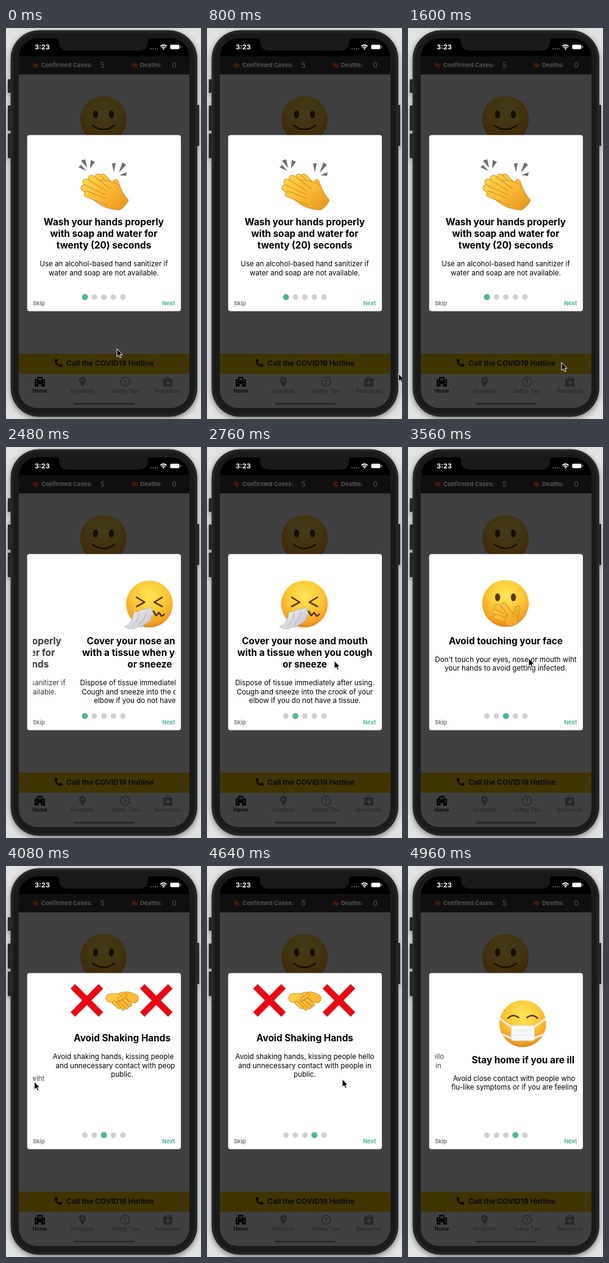
Write an HTML page that moves like this. It is 320 px wide and 640 px high and loops after 5000 ms.

```html
<!DOCTYPE html>
<html lang="en">
<head>
<meta charset="utf-8">
<title>Safety tips carousel</title>
<style>
  html, body { margin: 0; height: 100%; overflow: hidden; background: #e2e2e2; }
  svg { display: block; width: 100vw; height: 100vh; font-family: Inter, Roboto, sans-serif; }
  .title { font-size: 15.35px; font-weight: 700; text-anchor: middle; }
  .body { font-size: 11.6px; text-anchor: middle; }
  .link { font-size: 9.3px; font-weight: 700; }
  .stat { font-size: 9.5px; font-weight: 700; fill: #565656; }
  .tab { font-size: 8.45px; font-weight: 500; text-anchor: middle; fill: #272727; }
  .line { fill: none; stroke: #5c3206; stroke-width: 2.6; stroke-linecap: round; stroke-linejoin: round; }
  .phone { filter: drop-shadow(0 3px 5px rgba(0, 0, 0, .45)); }
</style>
</head>
<body>
<svg viewBox="0 0 320 640">
  <defs>
    <radialGradient id="skin" cy=".32" r=".7">
      <stop offset="0" stop-color="#ffe558"/><stop offset=".5" stop-color="#fdc935"/>
      <stop offset=".83" stop-color="#f6a324"/><stop offset="1" stop-color="#dc7a14"/>
    </radialGradient>
    <linearGradient id="hand" gradientUnits="userSpaceOnUse" x1="-25" y1="-15" x2="28" y2="38">
      <stop offset="0" stop-color="#ffd24a"/><stop offset=".55" stop-color="#fbb933"/><stop offset="1" stop-color="#ea9a20"/>
    </linearGradient>
    <linearGradient id="cloth" x2="1" y2="1">
      <stop offset="0" stop-color="#fafafc"/><stop offset="1" stop-color="#bdbdc4"/>
    </linearGradient>
    <clipPath id="window"><path d="M44 175H278V463H44Z"/></clipPath>
    <clipPath id="disc"><circle r="38"/></clipPath>
    <g id="face"><circle r="38.3" fill="url(#skin)"/></g>
    <g id="eyes" fill="#5c3206"><ellipse cx="-13" cy="-8" rx="4.2" ry="6.4"/><ellipse cx="13" cy="-8" rx="4.2" ry="6.4"/></g>
    <g id="smile"><use href="#face"/><use href="#eyes"/><path class="line" d="M-18 10Q0 23 18 10"/></g>
    <g id="sneeze">
      <use href="#face"/>
      <path class="line" d="M-21 -11L-8 -3 -21 4M21 -11L8 -3 21 4M2 17l5-5 4 7 5-5 4 6 4-3"/>
      <path fill="url(#cloth)" stroke="#a9a9b0" stroke-width=".7" d="M-25 12Q-19 15 -15 10Q-6 9 4 5Q3 11 7 16Q3 20 2 27L-5 32Q-10 34 -13 38Q-20 36 -25 40Q-34 42 -41 37Q-34 35 -31 30Q-26 20 -25 12Z"/>
      <path fill="none" stroke="#a9a9b2" d="M-17 15Q-18 28 -29 36M-5 13Q-9 26 -17 34"/>
    </g>
    <g id="mask">
      <use href="#face"/>
      <path class="line" d="M-24 -9Q-16 -17 -7 -10M7 -10Q16 -17 24 -9"/>
      <g clip-path="url(#disc)"><path fill="none" stroke="#eef1f6" stroke-width="3" d="M-39 -9L-18 6M39 -9L18 6M-36 17L-18 24M36 17L18 24"/></g>
      <rect x="-19" y="3" width="38" height="25" rx="3" fill="#f7f8fb" stroke="#cfd3dc" stroke-width=".8"/>
      <path stroke="#dde1e8" d="M-17 11H17M-17 19H17"/>
    </g>
    <g id="cross" fill="none"><path stroke="#c40a14" stroke-width="10.500" d="M-23 -23L23 23M23 -23L-23 23"/><path stroke="#f2040f" stroke-width="9" d="M-22.500 -22.500L22.500 22.500M22.500 -22.500L-22.500 22.500"/></g>
  </defs>

  <!-- phone -->
  <g fill="#242424" class="phone">
    <path d="M3 84h6v22H3zM3 127h6v41H3zM3 173h6v40H3zM312 126h5v67h-5z"/>
    <rect x="8" y="4" width="305.500" height="632" rx="46" stroke="#303030"/>
  </g>
  <rect x="12" y="8" width="297.500" height="624" rx="42" fill="#1a1a1a"/>
  <rect x="21" y="17" width="280" height="605" rx="30" fill="#404040"/>
  <path d="M21 46V47A30 30 0 0 1 51 17H271A30 30 0 0 1 301 47V46Z"/>
  <path fill="#1a1a1a" d="M82 16Q87 17 87 22Q87 37 102 37H218Q233 37 233 22Q233 17 238 16Z"/>
  <path fill="#101010" d="M21 46H301V76H21Z"/>
  <text x="47" y="35" fill="#fff" font-size="11" font-weight="700">3:23</text>
  <g fill="#777"><circle cx="238" cy="34" r="1"/><circle cx="241.500" cy="34" r="1"/><circle cx="245" cy="34" r="1"/><circle cx="248.500" cy="34" r="1"/></g>
  <path fill="none" stroke="#fff" stroke-width="1.800" d="M253.500 30Q258.500 25.500 263.500 30M255.500 32.200Q258.500 29.600 261.500 32.200"/>
  <circle cx="258.500" cy="34" r="1.300" fill="#fff"/>
  <rect x="269.500" y="27.500" width="15" height="7" rx="2" fill="#fff" stroke="#aaa" stroke-width=".8"/>
  <path fill="#bbb" d="M286 29.500h1.200v3H286z"/>

  <!-- dimmed home screen -->
  <g id="virus"></g>
  <g class="stat">
    <text x="58" y="64">Confirmed Cases:</text><text x="220" y="64">Deaths:</text>
    <g font-weight="400" font-size="11.500"><text x="155" y="65">5</text><text x="272.500" y="65">0</text></g>
  </g>
  <use href="#smile" x="160" y="149.500" style="filter:brightness(.26)"/>
  <path fill="#403400" d="M21 533H301V566H21Z"/>
  <text x="99" y="553.300" font-size="12" font-weight="700" fill="#0a0a0a">Call the COVID19 Hotline</text>
  <path fill="#0a0a0a" d="M80 543Q80 542 81 542H83.500Q84.300 542 84.400 543L84.900 545.500 83 547.300Q84.500 550 87.200 551.400L89 549.600 91.400 550.100Q92.300 550.300 92.300 551.100V553.500Q92.300 554.500 91.300 554.500Q80 554 80 543Z"/>
  <g fill="#272727">
    <path fill="#050505" d="M51 571h9v4h4v12h-6.500v-4h-4v4H47v-12h4z"/>
    <path fill="none" stroke="#404040" stroke-width="1.300" d="M54 573v4M57.500 573v4M54 575h3.500M49 578h2M49 582h2M60 578h2M60 582h2"/>
    <path d="M125.500 571a5.500 5.500 0 0 1 5.500 5.500q0 4-5.500 11q-5.500-7-5.500-11a5.500 5.500 0 0 1 5.500-5.500z"/>
    <path stroke="#404040" stroke-width="1.200" d="M124 574.500v4.500M127 574.500v4.500M124 576.700h3"/>
    <circle cx="195.500" cy="579" r="7.300" fill="none" stroke="#272727" stroke-width="1.500"/>
    <path d="M194.700 575h1.700v5h-1.700zM194.700 581.500h1.700v1.700h-1.700z"/>
    <path d="M262 574v-2.500h7.500v2.500h3.500v13h-15v-13zM263.500 574h4.500v-1.200h-4.500z" fill-rule="evenodd"/>
    <path stroke="#404040" stroke-width="1.800" d="M265.700 576.500v8M261.700 580.500h8"/>
    <rect x="111" y="613.500" width="100" height="3" rx="1.500"/>
  </g>
  <g class="tab">
    <text x="55.500" y="597" style="fill:#050505;font-weight:600">Home</text><text x="125.500" y="597">Hospitals</text>
    <text x="195.500" y="597">Safety Tips</text><text x="265.500" y="597">Resources</text>
  </g>

  <!-- carousel -->
  <rect x="34.700" y="175.200" width="252.300" height="288.300" rx="4" fill="#fff"/>
  <g id="pages" clip-path="url(#window)"></g>
  <g id="dots"></g>
  <text class="link" x="44" y="454" fill="#808080">Skip</text>
  <text class="link" x="277.500" y="454" fill="#4db59c" text-anchor="end">Next</text>
  <path id="cursor" stroke="#fff" stroke-width="1" d="M0 0V13L3 10.300 5 15 7.200 14 5.300 9.600H9.200Z"/>
</svg>
<script>
const LOOP = 5000, PAGE = 243.5, DRAG = 400;
const dragStarts = [2229, 3000, 3769, 4646];
const $ = id => document.getElementById(id);

// Rounded limbs: dark edge under a lighter core
const limb = (d, w) =>
  `<g fill="none" stroke-linecap="round" stroke-linejoin="round"><path d="${d}" stroke="#c67c18" stroke-width="${w}"/>` +
  `<path d="${d}" stroke="url(#hand)" stroke-width="${w - 1.5}"/></g>`;
const use = (id, x, y) => `<use href="#${id}" x="${x}" y="${y}"/>`;
const at = (x, y, art) => `<g transform="translate(${x} ${y})">${art}</g>`;

const clap =
  '<path fill="#6d6d72" d="M-41 -29L-37 -33 -28 -23ZM-37 -40L-30 -42 -27 -28ZM-22 -27L-21 -41 -14 -38ZM14 -35L20 -36 17 -21ZM31 -37L37 -33 25 -20ZM38 -21L37 -15 26 -16Z"/>' +
  limb('M24 14L-1 -13', 11) + limb('M18 16L-9 -13', 11) + limb('M27 16L20 -5', 9) +
  '<path fill="url(#hand)" stroke="#c67c18" stroke-width=".8" d="M-8 -8Q10 -8 20 -3L27 2Q31 14 41 25Q36 36 26 41Q8 40 -6 32L-22 20Z"/>' +
  limb('M8 10L-20 -11', 11) + limb('M6 17L-29 -5', 11) + limb('M8 24L-32 5', 11) + limb('M12 30L-27 15', 10) +
  '<path fill="url(#hand)" d="M3 5Q14 10 18 0Q20 8 26 15Q32 20 36 28Q32 36 25 40Q12 38 6 34Z"/>';

const cover = use('face', 0, 0) + use('eyes', 0, -2) +
  limb('M12 25L-14 6', 10) + limb('M10 28L-17 14', 9) + limb('M10 31L-15 22', 9) + limb('M13 24L-3 3', 9) +
  limb('M15 26L20 8', 9) + limb('M8 29L13 27', 18) + '<path fill="url(#hand)" d="M4 18L16 18 20 32 4 36Z"/>';

const shake = use('cross', -57.5, 0) + use('cross', 56.5, 0) +
  limb('M20 -3L10 -7 0 -6', 15) + limb('M-19 -4L-8 -4 6 5', 15) +
  [[13, 7], [8, 11], [2, 13]].map(([x, y]) => limb(`M${x - 9} ${y - 8}L${x} ${y}`, 7)).join('') +
  limb('M-13 4L-10 7M-8 8L-5 11', 6) + limb('M6 -9L-4 -2', 6);

const pages = [
  { art: at(160, 257, clap),
    title: ['Wash your hands properly', 'with soap and water for', 'twenty (20) seconds'],
    body: ['Use an alcohol-based hand sanitizer if', 'water and soap are not available.'] },
  { art: use('sneeze', 160, 257),
    title: ['Cover your nose and mouth', 'with a tissue when you cough', 'or sneeze'],
    body: ['Dispose of tissue immediately after using.', 'Cough and sneeze into the crook of your', 'elbow if you do not have a tissue.'] },
  { art: at(160, 256, cover),
    title: ['Avoid touching your face'],
    body: ["Don't touch your eyes, nose or mouth wiht", 'your hands to avoid getting infected.'] },
  { art: at(160, 220, shake), top: 287.3,
    title: ['Avoid Shaking Hands'],
    body: ['Avoid shaking hands, kissing people hello', 'and unnecessary contact with people in', 'public.'] },
  { art: use('mask', 160, 258),
    title: ['Stay home if you are ill'],
    body: ['Avoid close contact with people who have', 'flu-like symptoms or if you are feeling sick.'] }
];

const lines = (kind, texts, y, step) =>
  texts.map((s, i) => `<text class="${kind}" x="160.5" y="${y + i * step}">${s}</text>`).join('');

$('pages').innerHTML = pages.map(({ art, title, body, top = 322.5 }) =>
  `<g>${art}${lines('title', title, top, 19.4)}${lines('body', body, top + 29 + 19.4 * (title.length - 1), 14.5)}</g>`).join('');
$('dots').innerHTML = pages.map((_, i) => `<circle cx="${129.5 + i * 15.6}" cy="440.5"/>`).join('');
$('virus').innerHTML = [48.5, 211].map(x =>
  at(x, 61, '<g stroke="#45170b"><ellipse rx="4.6" ry="3" fill="#45170b"/><path d="M-5 -3L5 3M-4 3L4 -3"/><circle r="1.2" fill="#6b2a12"/></g>')).join('');

// Pointer stops: time, x, y
const stops = [
  [0, 182, 525], [280, 236, 556], [560, 303, 562], [840, 315, 566], [1160, 290, 562], [1600, 252, 547.5],
  [1700, 252, 546], [2040, 222, 370], [2220, 222, 350], [2450, -20, 352], [2580, -20, 352], [2760, 209, 350],
  [3000, 222, 350], [3360, -12, 352], [3420, -12, 352], [3560, 198, 346], [3772, 240, 347], [4080, 46.5, 353],
  [4180, -15, 355], [4260, -15, 355], [4420, 198, 350], [4640, 222, 349], [4900, -20, 352], [LOOP, -20, 352]
];

const ease = u => { u = Math.min(1, Math.max(0, u)); return u * u * (3 - 2 * u); };

function pointer(t) {
  const i = stops.findIndex(s => s[0] > t);
  const [t0, x0, y0] = stops[i - 1], [t1, x1, y1] = stops[i];
  const k = ease((t - t0) / (t1 - t0));
  return [x0 + (x1 - x0) * k, y0 + (y1 - y0) * k];
}

function draw(now) {
  const t = now % LOOP;
  const scroll = dragStarts.reduce((sum, start) => sum + ease((t - start) / DRAG), 0);
  const active = dragStarts.filter(start => t >= start + DRAG + 10).length;

  [...$('pages').children].forEach((page, i) => {
    const offset = i - scroll;
    page.setAttribute('transform', `translate(${offset * PAGE} 0)`);
    page.setAttribute('opacity', Math.max(0, 1 + Math.min(0, offset) * .3));
    page.setAttribute('visibility', Math.abs(offset) < 1 ? 'visible' : 'hidden');
  });
  [...$('dots').children].forEach((dot, i) => {
    dot.setAttribute('fill', i === active ? '#4db59c' : '#d0d0d0');
    dot.setAttribute('r', i === active ? 5 : 4.5);
  });
  const tilt = t > 2700 && t < 2840 ? 60 : 20;
  document.querySelectorAll('#virus g g').forEach(g => g.setAttribute('transform', `rotate(${tilt})`));
  $('cursor').setAttribute('transform', `translate(${pointer(t)})`);
}

const begin = performance.now();
(function tick() {
  draw(performance.now() - begin);
  requestAnimationFrame(tick);
})();
</script>
</body>
</html>
```
